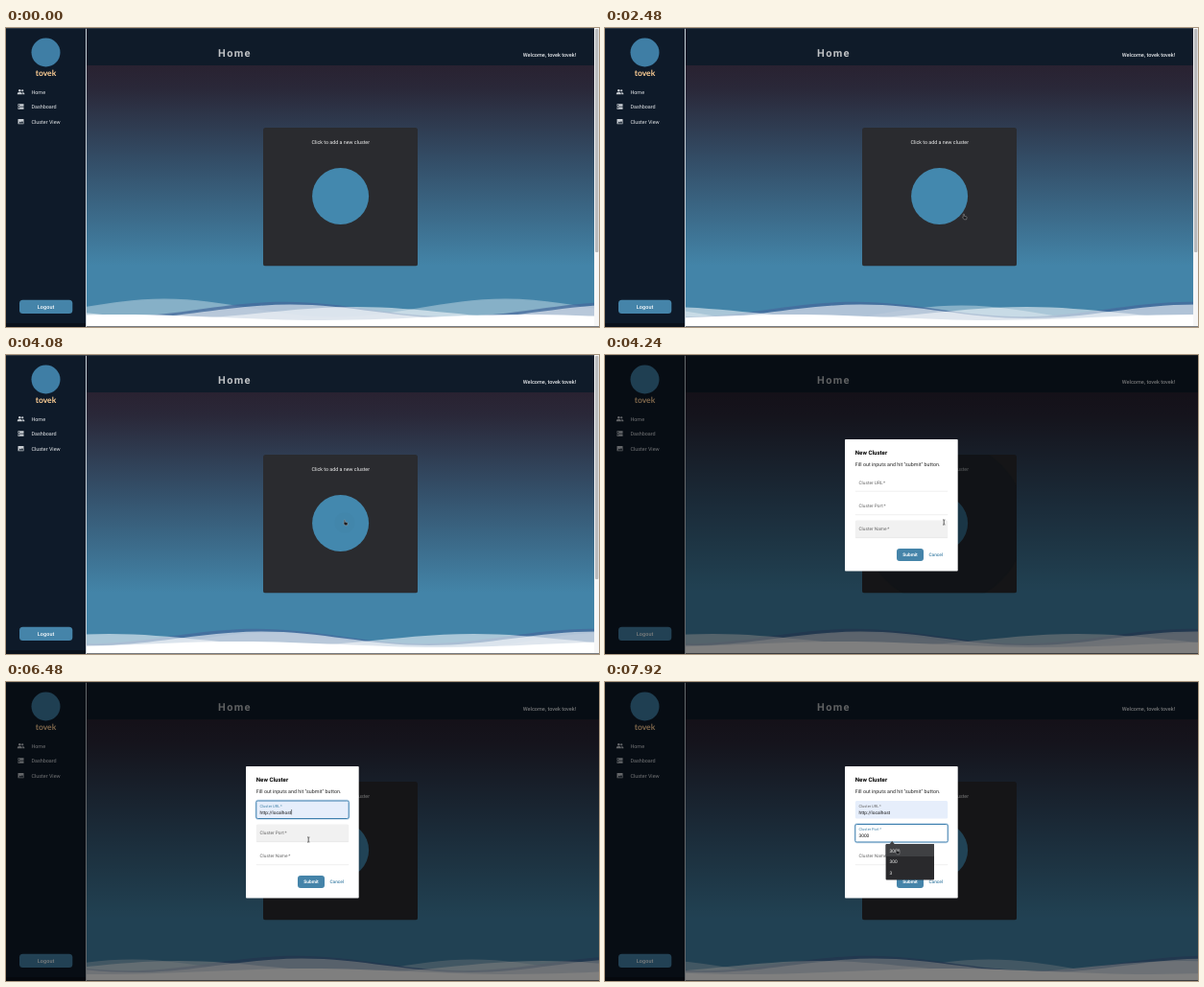
Write an HTML page that moves like this. It is 618 by 312 pixels and loops after 8 s.

```html
<!DOCTYPE html>
<html lang="en">
<head>
<meta charset="utf-8">
<title>New cluster</title>
<style>
  html, body { margin: 0; width: 100%; height: 100%; overflow: hidden; background: #0e1a29; }
  svg { display: block; width: 618px; height: 312px; }
  text { font-family: Roboto, Arial, sans-serif; font-size: 5.45px; text-rendering: geometricPrecision; white-space: pre; }
  .light { fill: #e4e7ea; }
  .bold { font-weight: 700; }
  .med { font-weight: 500; }
  .mid { text-anchor: middle; }
  .small { font-size: 4.8px; }

  .loop { animation: 8s linear infinite; }
  #swell, #foam { animation-name: sway; animation-timing-function: ease-in-out; }
  #mist { animation-name: drift-left; }
  #spray, #base { animation-name: drift-right; }
  #dim { animation-name: dim; }
  #dialog { animation-name: open; transform-origin: 309px 157px; }
  #ripple { animation-name: ripple; transform-origin: 353px 175px; }
  #bar { animation-name: bar; }
  #cursor { animation-name: point; animation-timing-function: ease-in-out; }

  @keyframes sway {
    0% { transform: translateX(12px); }
    20%, 53% { transform: translateX(-18px); }
    81% { transform: translateX(24px); }
    100% { transform: translateX(-4px); }
  }
  @keyframes drift-left {
    30% { transform: translate(-144px, 7px); }
    to { transform: translate(-480px, 7px); }
  }
  @keyframes drift-right { to { transform: translateX(240px); } }
  @keyframes dim { 0%, 51.2% { opacity: 0; } 52.6%, 100% { opacity: 1; } }
  @keyframes open {
    0%, 51.29% { opacity: 0; transform: scale(.7); }
    51.3% { opacity: .2; transform: scale(.7); }
    52.8%, 100% { opacity: 1; transform: none; }
  }
  @keyframes ripple {
    0%, 51% { opacity: 0; transform: scale(.1); }
    51.2% { opacity: .25; transform: scale(.2); }
    53% { opacity: .25; transform: scale(.85); }
    55% { opacity: .2; transform: scale(1.15); }
    58%, 100% { opacity: 0; transform: scale(1.15); }
  }
  @keyframes bar { 0%, 51.3% { opacity: 1; } 51.4%, 100% { opacity: 0; } }
  @keyframes point {
    0%, 13% { transform: translate(480px, 318px); }
    17%, 19% { transform: translate(437px, 246px); }
    30%, 32% { transform: translate(373px, 194px); }
    42%, 54% { transform: translate(352px, 172px); }
    59%, 76% { transform: translate(308px, 132px); }
    80.5%, 82% { transform: translate(314px, 162px); }
    85%, 89% { transform: translate(304px, 157px); }
    95%, 100% { transform: translate(303px, 174px); }
  }
</style>
</head>
<body>
<svg viewBox="0 0 618 312">
  <defs>
    <linearGradient id="sky" gradientUnits="userSpaceOnUse" x1="0" y1="39" x2="0" y2="248">
      <stop offset="0" stop-color="#292231"/>
      <stop offset=".12" stop-color="#2a2839"/>
      <stop offset=".5" stop-color="#34506a"/>
      <stop offset="1" stop-color="#4384a8"/>
    </linearGradient>
    <clipPath id="sea"><rect x="84" y="270" width="534" height="41"/></clipPath>
    <clipPath id="tile"><rect x="268" y="104" width="161" height="144.5" rx="2.5"/></clipPath>
  </defs>

  <rect x="84" y="39" width="534" height="272" fill="url(#sky)"/>
  <g clip-path="url(#sea)">
    <path id="mist" class="loop" fill="#fff" fill-opacity=".36"/>
    <path id="swell" class="loop" fill="#46699c" fill-opacity=".72"/>
    <path id="foam" class="loop" fill="#fff" fill-opacity=".58"/>
    <path id="spray" class="loop" fill="#fff" fill-opacity=".55"/>
    <path id="base" class="loop" fill="#fff"/>
  </g>
  <rect x="84" y="311" width="534" height="1" fill="#777b80"/>

  <rect x="84" width="529" height="39" fill="#0f1b29"/>
  <text x="221" y="30" class="bold" fill="#c0c3c6" style="font-size:11px;letter-spacing:1.35px">Home</text>
  <text x="594.2" y="30" class="med light" text-anchor="end" style="font-size:5.55px">Welcome, tovek tovek!</text>

  <rect width="83" height="312" fill="#0e1a29"/>
  <rect y="308" width="83" height="4" fill="#0a111b"/>
  <rect x="83" width="1" height="312" fill="#c9d0d6"/>
  <rect width="618" height=".8" fill="#39424d"/>
  <circle cx="41.5" cy="25.5" r="15" fill="#3f7ea5"/>
  <text x="41.5" y="50" class="bold mid" fill="#ffcf95" style="font-family:Lato,sans-serif;font-size:8.6px">tovek</text>

  <g fill="#c9ced3">
    <circle cx="14.3" cy="65.3" r="1.3"/><circle cx="17.2" cy="65.3" r="1.1"/>
    <path d="M11.8 69.2v-.8q0-1.4 2.5-1.4t2.5 1.4v.8zM17.3 69.2v-1q0-.6-.4-1.1 2.4.1 2.4 1.4v.7z"/>
    <path d="M12.5 79.3h6v2.4h-6zM12.5 82.4h6v2.4h-6z"/>
    <rect x="12.5" y="94.9" width="6" height="5.4" rx=".6"/>
    <path d="M13.3 99.4l1.4-1.8 1 1.1 1.3-1.8 1.2 2.5z" fill="#0e1a29"/>
    <path d="M13.2 80.1h1v.8h-1zM13.2 83.2h1v.8h-1z" fill="#0e1a29"/>
  </g>
  <g class="light">
    <text x="26.4" y="68.6">Home</text>
    <text x="26.4" y="84">Dashboard</text>
    <text x="26.4" y="99.5">Cluster View</text>
  </g>
  <rect x="14" y="283.7" width="55.3" height="14.3" rx="3.5" fill="#4584a9"/>
  <text x="41.6" y="292.8" class="med mid" fill="#fff" style="letter-spacing:.1px">Logout</text>

  <g clip-path="url(#tile)">
    <rect x="268" y="104" width="161" height="144.5" fill="#2a2b2f"/>
    <text x="318.4" y="121" fill="#f1f1f1" style="font-size:5.33px">Click to add a new cluster</text>
    <circle cx="348.6" cy="175.5" r="29.5" fill="#4388ae"/>
    <circle id="ripple" class="loop" cx="353" cy="175" r="100" fill="#0c1c2c"/>
  </g>

  <g id="bar" class="loop">
    <rect x="613" width="5" height="311" fill="#f6f6f6"/>
    <rect x="614" y="1" width="3.4" height="233" rx="1" fill="#b9babc"/>
  </g>

  <rect id="dim" class="loop" width="618" height="312" fill="#000" fill-opacity=".5"/>

  <g id="dialog" class="loop">
    <rect x="250" y="88" width="117.7" height="137.5" rx=".8" fill="#fff"/>
    <text x="260.8" y="103.6" class="bold" style="font-size:6.1px">New Cluster</text>
    <text x="260.8" y="116" fill="#222" style="font-size:5.35px">Fill out inputs and hit "submit" button.</text>
    <g id="fields"></g>
    <rect x="304" y="202" width="28" height="13" rx="3" fill="#4584a9"/>
    <text x="318" y="210.2" class="bold mid small" fill="#fff">Submit</text>
    <text x="344.8" y="210.2" class="med mid small" fill="#4584a9">Cancel</text>
  </g>

  <g id="popup">
    <path d="M296.5 169.2l2.7-3.2 2.7 3.2z" fill="#3f4043"/>
    <rect x="292.6" y="169" width="50.4" height="37.5" rx="1" fill="#29292c"/>
    <rect id="row" x="292.6" y="169" width="50.4" height="13" rx="1" fill="#3f4043"/>
    <g fill="#f2f2f2">
      <text x="296.6" y="177.8" class="small">3000</text>
      <text x="296.6" y="189.4" class="small">300</text>
      <text x="296.6" y="201" class="small">3</text>
    </g>
  </g>

  <g id="cursor" class="loop" stroke-linejoin="round">
    <path id="arrow" d="M0 0v5.2l1.3-1.1.9 2 .9-.4-.9-1.9h1.7z" fill="#000" stroke="#fff" stroke-width=".6"/>
    <path id="hand" d="M.9 0q.6 0 .6.6v1.7l2 .5q.7.2.6.9l-.4 2.1h-2.4L-.4 3.7q.2-.7.7-.4V.6q0-.6.6-.6z" fill="#1b1c1f" stroke="#c8c8c8" stroke-width=".4"/>
    <path id="beam" d="M0 0h.7l.5.4.5-.4h.7M1.2.4v4.2M0 5h.7l.5-.4.5.4h.7" fill="none" stroke="#222" stroke-width=".7"/>
  </g>
</svg>
<script>
const $ = id => document.getElementById(id);
const show = (el, on) => { el.style.display = on ? "" : "none"; };

// Rolling wave: one crest at the given x, repeated each span
function wave(id, crest, top, depth, span) {
  const h = span / 2;
  let d = `M${crest - 3 * span} ${top}`;
  for (let i = 0; i < 12; i++) {
    const y = i % 2 ? -depth : depth;
    d += `c${h * .36} 0 ${h * .64} ${y} ${h} ${y}`;
  }
  $(id).setAttribute("d", d + `V320H${crest - 3 * span}z`);
}
wave("mist", 165, 282.5, 19, 355);
wave("swell", 278, 285.8, 15.5, 350);
wave("foam", 284, 288.6, 14.5, 350);
wave("spray", 365, 291, 12, 380);
wave("base", 120, 299, 6, 420);

function field(name, y) {
  const g = document.createElementNS("http://www.w3.org/2000/svg", "g");
  g.innerHTML = `
    <rect x="260.2" y="${y - .8}" width="97.6" height="20.1" rx="2" fill="none" stroke="#bcd5ea" stroke-width=".8"/>
    <rect x="260.8" y="${y}" width="96.4" height="18.5" rx="1.5"/>
    <path d="M260.8 ${y + 18.2}h96.4" stroke="#dedede" stroke-width=".5"/>
    <text x="264.5">Cluster ${name}<tspan dx=".6">*</tspan></text>
    <text x="264.5" y="${y + 13.5}" fill="#111" class="small"></text>
    <path stroke="#111" stroke-width=".5"/>`;
  $("fields").append(g);
  const [glow, box, line, label, value, caret] = g.children;
  return ({ focus, hover, text = "", filled, blink }) => {
    const up = focus || text;
    show(glow, focus);
    show(line, !focus && !filled);
    box.setAttribute("fill", filled ? "#e6eefb" : hover ? "#f1f1f1" : "#fff");
    box.setAttribute("stroke", focus ? "#3d7fae" : "none");
    label.setAttribute("y", y + (up ? 6.6 : 10.7));
    label.style.fontSize = up ? "4px" : "4.8px";
    label.setAttribute("fill", focus ? "#4584a9" : "#666");
    value.textContent = text;
    show(caret, blink);
    if (blink) {
      const x = 264.9 + (text ? value.getComputedTextLength() : 0);
      caret.setAttribute("d", `M${x} ${y + 9}v5.4`);
    }
  };
}
const url = field("URL", 124);
const port = field("Port", 148.5);
const label = field("Name", 172.5);

const address = "http://localhost";
let start;

function draw(now) {
  start ??= now;
  const t = (now - start) % 8000;
  const within = (a, b) => t >= a && t < b;
  const typed = Math.max(0, Math.floor((t - 5040) / 75));
  const onUrl = within(4800, 6800);
  const onPort = t >= 6800;
  const blink = t % 1060 < 530;

  url({
    focus: onUrl, text: address.slice(0, typed), filled: typed >= address.length,
    hover: within(4640, 4800), blink: onUrl && (blink || within(5040, 6500))
  });
  port({
    focus: onPort, text: t >= 7600 ? "3000" : "",
    hover: within(6280, 6800), blink: onPort && t < 7600 && blink
  });
  label({ hover: within(4160, 4480) });

  show($("popup"), t >= 7120);
  show($("row"), t >= 7520);
  show($("arrow"), t < 1900);
  show($("hand"), within(1900, 4160) || t >= 7440);
  show($("beam"), within(4160, 7440));
  requestAnimationFrame(draw);
}
requestAnimationFrame(draw);
</script>
</body>
</html>
```
